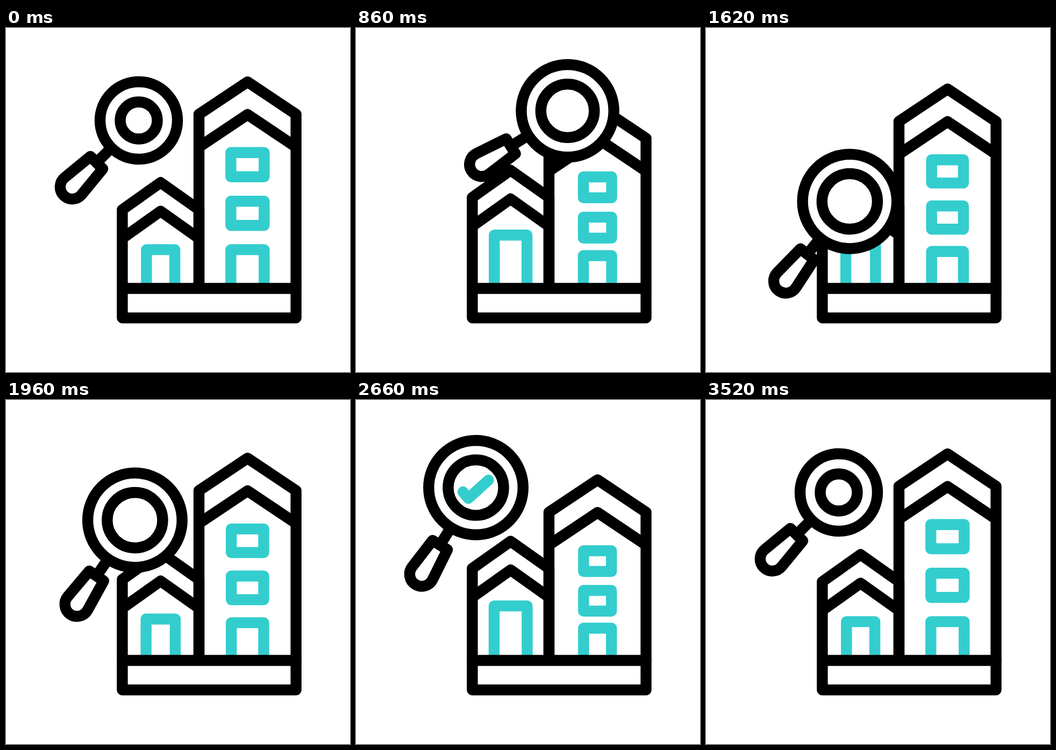
An HTML page that plays this animation: 640 px wide and 640 px high, repeating every 3600 ms.

```html
<!DOCTYPE html>
<html lang="en">
<head>
<meta charset="utf-8">
<title>House search</title>
<style>
  html, body { margin: 0; width: 100%; height: 100%; overflow: hidden; background: #fff; }
  svg { display: block; width: 100vw; height: 100vh; }
  .ink, .teal { fill: none; stroke: #000; stroke-width: 20.4; stroke-linejoin: round; }
  .teal { stroke: #33cdcd; }
  .solid { fill: #fff; }
  #tick { stroke-linecap: round; }
</style>
</head>
<body>
<svg viewBox="0 0 640 640">
  <g class="teal">
    <path id="win1"/><path id="win2"/><path id="door"/><path id="smallDoor"/>
  </g>
  <g class="ink">
    <path id="small"/><path id="tall"/>
    <path d="M216.4 484.5H539.6V539.4H216.4Z"/>
  </g>
  <g id="glass" class="ink">
    <g id="arm">
      <path id="neck"/>
      <path id="grip" class="solid" d="M111 16.3L172.8 22.4A22.5 22.5 0 1 0 172.8 -22.4L111 -16.3Z"/>
    </g>
    <circle id="outer" class="solid"/>
    <circle id="inner"/>
    <path id="tick" class="teal" d="M-24 5L-14 17L23.5 -17"/>
  </g>
</svg>
<script>
const LOOP = 3600, STEP = 20;
const $ = id => document.getElementById(id);
const set = (id, name, value) => $(id).setAttribute(name, value);

// y of a cubic Bezier whose x control points are at thirds, so x equals its parameter
const soft = p => 3 * (1 - p) ** 2 * p * 0.12 + 3 * (1 - p) * p * p * 0.98 + p ** 3;

// keys: [time, value, easing towards this key]
function track(keys, t) {
  if (t <= keys[0][0]) return keys[0][1];
  for (let i = 1; i < keys.length; i++) {
    const [t0, a] = keys[i - 1], [t1, b, ease] = keys[i];
    if (t <= t1) {
      const p = (t - t0) / (t1 - t0);
      return a + (b - a) * (ease ? ease(p) : p);
    }
  }
  return keys[keys.length - 1][1];
}

// lens stops: rest, tall house, small house, verdict, rest
const stops = (a, b, c, d) =>
  [[200, a], [1032, b, soft], [1600, c], [2168, d], [2900, d], [3436, a]];
const lensX = stops(247, 411, 269, 223);
const lensY = stops(172, 152, 328.5, 163);
const lensTurn = stops(0, -14.6, 6, 13);
const lensGrow = stops(0, 1, 1, 1);
const sinking = [[200, 0], [1032, 50, soft], [1832, 0], [2632, 50], [3434, 0]];
const tickSize = [[2300, 0], [2480, 1.22], [2620, 1], [2900, 1], [3520, 0]];

const gable = (x0, x1, x2, eave, top) => `L${x0} ${eave}L${x1} ${top}L${x2} ${eave}`;

function house(id, x0, x1, x2, y, roof) {
  const [eave, top, eave2, top2] = roof.map(v => v + y);
  set(id, 'd', `M${x0} 485${gable(x0, x1, x2, eave, top)}V485` +
    `M${x0} ${eave2}L${x1} ${top2}L${x2} ${eave2}`);
}

function pane(id, top, half, height) {
  const cx = 449.3;
  set(id, 'd', `M${cx - half} ${top}H${cx + half}v${height}H${cx - half}Z`);
}

const doorway = (id, cx, half, top) =>
  set(id, 'd', `M${cx - half} 485V${top}H${cx + half}V485`);

function draw(t) {
  const d = track(sinking, t);
  house('tall', 359, 449.4, 539.6, d, [160.5, 100.3, 221.5, 161]);
  house('small', 216.4, 287.6, 359, -0.51 * d, [338, 287.5, 391.5, 340.8]);
  const half = 31 - 0.105 * d, height = 45 - 0.135 * d;
  pane('win1', 231.8 + 1.01 * d, half, height);
  pane('win2', 322.2 + 0.665 * d, half, height);
  doorway('door', 449.3, half, 412.4 + 0.25 * d);
  doorway('smallDoor', 287.7, 26.4 + 0.09 * d, 412.4 - 0.606 * d);

  const grow = track(lensGrow, t), reach = 15 * grow, radius = 72 + 15.8 * grow;
  set('glass', 'transform', `translate(${track(lensX, t)} ${track(lensY, t)})`);
  set('arm', 'transform', `rotate(${135 - track(lensTurn, t)})`);
  set('neck', 'd', `M${radius} 0H${111 + reach}`);
  set('grip', 'transform', `translate(${reach} 0)`);
  set('outer', 'r', radius);
  set('inner', 'r', 34.5 + 17.1 * grow);

  const size = track(tickSize, t);
  set('tick', 'transform', `translate(0 3) scale(${size})`);
  set('tick', 'visibility', size > 0 ? 'visible' : 'hidden');
}

const start = performance.now();
function frame() {
  const t = (performance.now() - start) % LOOP;
  draw(Math.floor(t / STEP) * STEP);
  requestAnimationFrame(frame);
}
frame();
</script>
</body>
</html>
```
